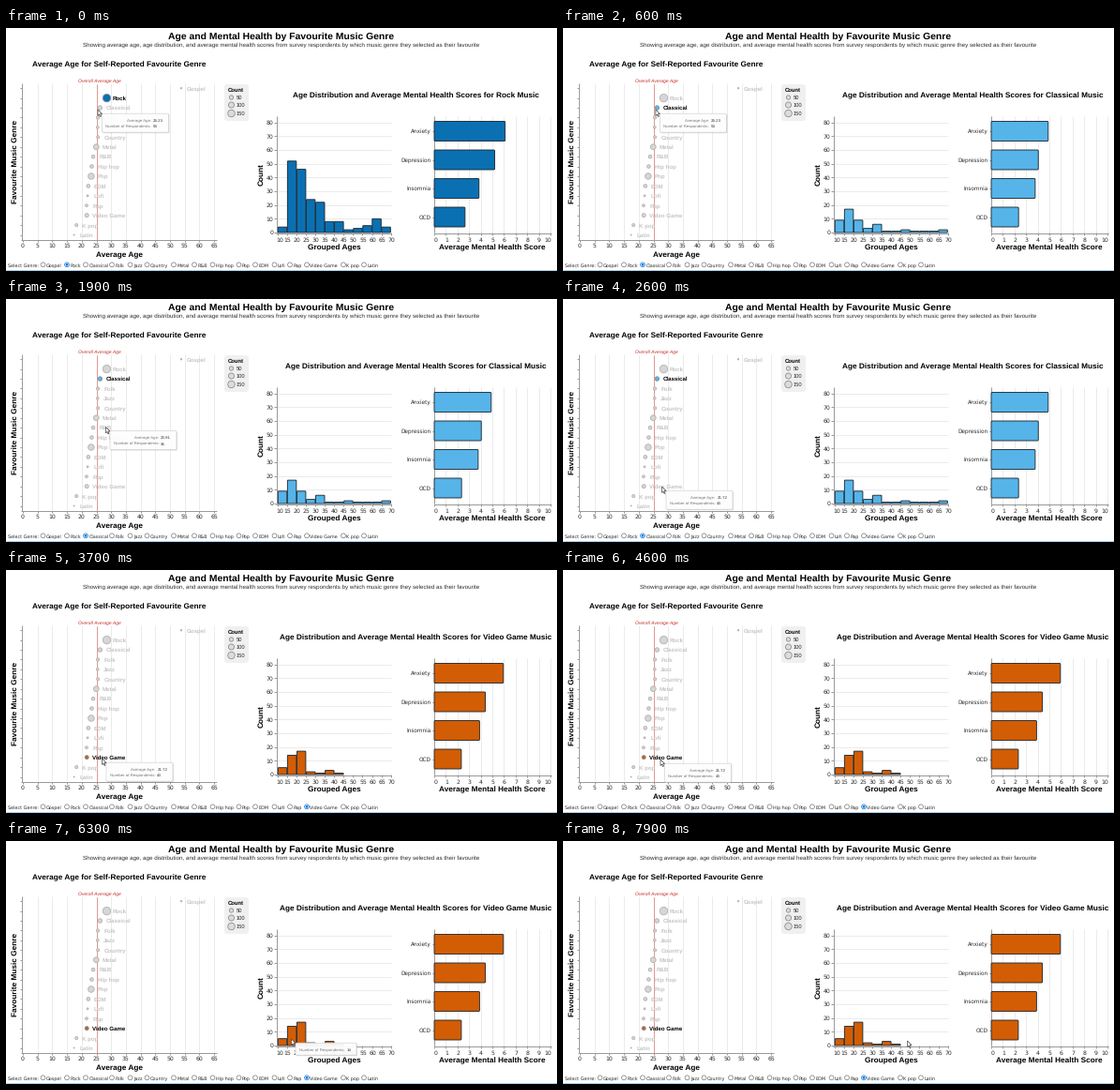
These frames come from a looping animation (588 by 259 pixels, 8000 ms). A matplotlib script:

```python
import numpy as np
import matplotlib.pyplot as plt
from matplotlib.animation import FuncAnimation
from matplotlib.patches import Circle, FancyBboxPatch, Polygon

W, H, DPI = 588, 259, 100
PX = 72 / DPI  # points per pixel
FRAMES, STEP = 80, 100

plt.rcParams["font.family"] = "Liberation Sans"
plt.rcParams["text.hinting"] = "none"

fig = plt.figure(figsize=(W / DPI, H / DPI), dpi=DPI, facecolor="white")
ax = fig.add_axes([0, 0, 1, 1])
ax.set_xlim(0, W)
ax.set_ylim(H, 0)
ax.axis("off")

GRID, AXIS, INK, FADED = "#ebebeb", "#9a9a9a", "#2a2a2a", "#c6c6c6"
WIDE = dict(family="DejaVu Sans")

# name, average age, respondents, radio button x
GENRES = [
    ("Gospel", 53.83, 6, 39.5), ("Rock", 28.51, 188, 65),
    ("Classical", 26.23, 53, 85), ("Folk", 25.48, 29, 113),
    ("Jazz", 25.40, 20, 132.5), ("Country", 25.52, 25, 150.5),
    ("Metal", 24.93, 88, 179), ("R&B", 23.91, 35, 201),
    ("Hip hop", 23.40, 35, 220.5), ("Pop", 23.22, 114, 248.5),
    ("EDM", 22.24, 37, 266), ("Lofi", 22.00, 10, 286.5),
    ("Rap", 21.64, 22, 303), ("Video Game", 21.72, 43, 321),
    ("K pop", 18.23, 26, 360), ("Latin", 17.40, 3, 382),
]
NAMES = [g[0] for g in GENRES]

# colour, age histogram, mental health scores
DETAILS = {
    "Rock": ("#0a70b2", [4, 52, 46, 24, 22, 8, 8, 2, 3, 5, 10, 4],
             [6.1, 5.2, 3.85, 2.65]),
    "Classical": ("#56b4e9", [9, 17, 9, 3, 6, 1, 1, 2, 1, 1, 1, 2],
                  [4.9, 4.05, 3.78, 2.35]),
    "Video Game": ("#d35d04", [5, 14, 17, 2, 1, 3, 1, 0, 0, 0, 0, 0],
                   [5.95, 4.4, 3.9, 2.33]),
}


def text(x, y, s, size, color=INK, bold=False, ha="left", z=5, **kw):
    """Text whose capitals are centred on y, size in pixels."""
    return ax.text(x, y + 0.36 * size, s, fontsize=size * PX, color=color,
                   fontweight="bold" if bold else "normal", ha=ha,
                   va="baseline", zorder=z, **kw)


def tick_label(x, y, s, ha="center", size=6.1):
    return text(x, y, s, size, ha=ha, **WIDE)


def heading(x, y, s, size=8.25):
    return text(x, y, s, size, "black", True, "center")


def side_heading(x, y, s, size=8.25):
    ax.text(x + 0.36 * size, y, s, fontsize=size * PX, color="black",
            fontweight="bold", rotation=90, rotation_mode="anchor",
            ha="center", va="baseline", zorder=5)


def line(x0, y0, x1, y1, color=AXIS, width=1, z=1):
    ax.plot([x0, x1], [y0, y1], color=color, lw=width * PX, zorder=z,
            solid_capstyle="butt")


def box(x, y, w, h, radius, face, edge="none", width=0.8, z=3, **kw):
    patch = FancyBboxPatch((x, y), w, h, fc=face, ec=edge, lw=width * PX,
                           boxstyle=f"round,pad=0,rounding_size={radius}",
                           zorder=z, **kw)
    return ax.add_patch(patch)


def circle(x, y, r, face, edge, width=0.8, z=4):
    return ax.add_patch(Circle((x, y), r, fc=face, ec=edge,
                               lw=width * PX, zorder=z))


def age_x(age):
    return 18 + 3.14 * age


def row_y(i):
    return 64.2 + 10.42 * i


def dot_r(count):
    return 0.306 * np.sqrt(count)


def count_y(n):
    return 218 - 1.465 * n


def score_x(v):
    return 457 + 12.4 * v


# Page headings
heading(293.5, 8, "Age and Mental Health by Favourite Music Genre", 10.4)
text(294, 18, "Showing average age, age distribution, and average mental "
     "health scores from survey respondents by which music genre they "
     "selected as their favourite", 6.24, ha="center")
heading(120.5, 38, "Average Age for Self-Reported Favourite Genre", 8.3)
detail_title = heading(437.5, 71.5, "")

# Dot plot
for age in range(0, 70, 5):
    x = age_x(age)
    if age:
        line(x, 59, x, 225, GRID)
    line(x, 226, x, 228)
    tick_label(x, 232, str(age))
line(16.5, 59, 16.5, 226)
line(16, 225.5, 225, 225.5)
line(96.5, 60, 96.5, 226, "#e08f8b", 0.9, z=2)
text(100, 56, "Overall Average Age", 5, "#c8322e", ha="center",
     fontstyle="italic")
heading(121, 241, "Average Age")
side_heading(8.5, 142, "Favourite Music Genre")

dots, labels = [], []
for i, (name, age, count, _) in enumerate(GENRES):
    x, y = age_x(age), row_y(i)
    line(14.5, y, 16.5, y)
    dots.append(circle(x, y, dot_r(count), "#d6d6d6", "#b0b0b0"))
    labels.append(text(x + 6.2, y, name, 6.2, FADED, True))

# Size legend
box(233, 60, 26, 39, 3, "#f0f0f0")
text(237, 66, "Count", 5.9, "black", True)
for count, y in ((50, 74), (100, 82), (150, 91)):
    circle(240.5, y, dot_r(count), "#dcdcdc", "#8c8c8c")
    text(246, y, str(count), 5.8)

# Histogram
for n in range(0, 90, 10):
    y = count_y(n)
    if n:
        line(288, y, 411, y, GRID)
    line(285.5, y, 288.5, y)
    tick_label(285, y, str(n), "right")
for i in range(13):
    x = 290 + 10.05 * i
    line(x, 218, x, 221)
    tick_label(x + (2.5 if i == 0 else 0.5), 225.5, str(10 + 5 * i))
line(288.5, 94, 288.5, 218)
line(288, 218.5, 411, 218.5)
heading(350.5, 233.5, "Grouped Ages")
side_heading(271.5, 156, "Count")

# Score chart
for v in range(11):
    x = score_x(v)
    line(x, 94, x, 218, GRID)
    line(x, 218, x, 221)
    if v == 0:
        tick_label(x, 225.5, "0", "left")
    elif v == 10:
        tick_label(x + 1, 225.5, "10", "right")
    else:
        tick_label(x + 0.4, 225.5, str(v))
line(457, 94, 457, 218)
line(457, 218.5, 582, 218.5)
heading(519, 233.5, "Average Mental Health Score")
for i, name in enumerate(("Anxiety", "Depression", "Insomnia", "OCD")):
    y = 110 + 30.5 * i
    line(454.5, y, 457, y)
    tick_label(454, y, name, "right", 5.8)

BAR = dict(face="white", edge="#1c2833", width=0.9)
bins = [box(290.3 + 10.05 * i, 217, 9.5, 1, 0.6, **BAR) for i in range(12)]
scores = [box(457, 99.5 + 30.5 * i, 1, 21, 1, **BAR) for i in range(4)]

# Radio buttons
text(2, 253, "Select Genre:", 4.9, **WIDE)
rings = []
for name, _, _, x in GENRES:
    rings.append(circle(x, 252.3, 2.4, "white", "#767676", 0.7))
    text(x + 3.4, 253, name, 4.9, **WIDE)
radio_dot = circle(0, 252.3, 1.4, "#0a75e0", "none", z=5)
line(0, 258.2, W, 258.2, "#9fcdea")

# Tooltip
shadow = box(0, 0, 1, 1, 1, "#000000", z=9, alpha=0.13)
panel = box(0, 0, 1, 1, 1, "white", "#cfcfcf", 0.7, z=10, alpha=0.95)
tip_rows = [(text(0, 0, "", 4.4, "#777777", ha="right", z=11),
             text(0, 0, "", 4.4, "#333333", z=11)) for _ in range(2)]

# Mouse pointer
ARROW = 0.85 * np.array([(0, 0), (0, 7.6), (1.8, 6), (3, 8.8), (4.2, 8.2),
                         (3, 5.5), (5.4, 5.4)])
pointer = ax.add_patch(Polygon(ARROW, fc="white", ec="#444444",
                               lw=0.7 * PX, zorder=20))

PATH = np.array([
    (0, 98, 87), (700, 99, 87), (1200, 106.5, 97), (1500, 107, 100),
    (2600, 105.5, 200), (3200, 103, 201), (3700, 102.5, 201),
    (4600, 104, 202), (5200, 129, 211), (5400, 180, 215),
    (5900, 302, 213), (6300, 304.5, 211), (7300, 305.5, 211),
    (7700, 350, 214), (7900, 367.5, 213),
])


def selected(t):
    return "Rock" if t < 500 else "Classical" if t < 3200 else "Video Game"


def hover(t, x, y, hist):
    """Rows of the tooltip under the pointer, or an empty list."""
    row = None
    if 4600 <= t < 5300:
        row = NAMES.index("Video Game")
    else:
        for i, (name, age, count, _) in enumerate(GENRES):
            left = age_x(age) - dot_r(count) - 3
            right = age_x(age) + 6.2 + 3.5 * len(name)
            if left <= x <= right and abs(y - row_y(i)) < 4:
                row = i
    if row is not None:
        _, age, count, _ = GENRES[row]
        return [("Average Age:", f"{age:.2f}"),
                ("Number of Respondents:", str(count))]
    i = int((x - 290) // 10.05)
    if 0 <= i < 12 and hist[i] and count_y(hist[i]) <= y <= 218:
        return [("Number of Respondents:", str(hist[i]))]
    return []


def show_tooltip(x, y, rows):
    w, h = (71, 20) if len(rows) == 2 else (65, 13)
    for patch, d in ((panel, 0), (shadow, 1)):
        patch.set_visible(bool(rows))
        patch.set_bounds(x + d, y + d, w, h)
    for i, (key, value) in enumerate(tip_rows):
        on = i < len(rows)
        key.set_visible(on)
        value.set_visible(on)
        if on:
            base = y + 7 + 6.5 * i + 1.6
            key.set_text(rows[i][0])
            key.set_position((x + 52.5, base))
            value.set_text(rows[i][1])
            value.set_position((x + 54.3, base))


def update(frame):
    t = frame * STEP
    genre = selected(t)
    color, hist, values = DETAILS[genre]
    detail_title.set_text("Age Distribution and Average Mental Health "
                          f"Scores for {genre} Music")

    for i, name in enumerate(NAMES):
        on = name == genre
        dots[i].set_facecolor(color if on else "#d6d6d6")
        dots[i].set_edgecolor("#7d909c" if on else "#b0b0b0")
        labels[i].set_color("black" if on else FADED)
        rings[i].set_edgecolor("#0a75e0" if on else "#767676")
        if on:
            radio_dot.center = (GENRES[i][3], 252.3)

    for bar, n in zip(bins, hist):
        bar.set_visible(n > 0)
        bar.set_y(count_y(n))
        bar.set_height(218 - count_y(n))
        bar.set_facecolor(color)
    for bar, v in zip(scores, values):
        bar.set_width(score_x(v) - 457)
        bar.set_facecolor(color)

    x, y = (np.interp(t, PATH[:, 0], PATH[:, k]) for k in (1, 2))
    pointer.set_xy(ARROW + (x, y))
    show_tooltip(x + 4.5, y + 4.2, hover(t, x, y, hist))
    return []


anim = FuncAnimation(fig, update, frames=FRAMES, interval=STEP,
                     init_func=lambda: update(0), repeat=True,
                     repeat_delay=0, blit=False)
plt.show()
```
